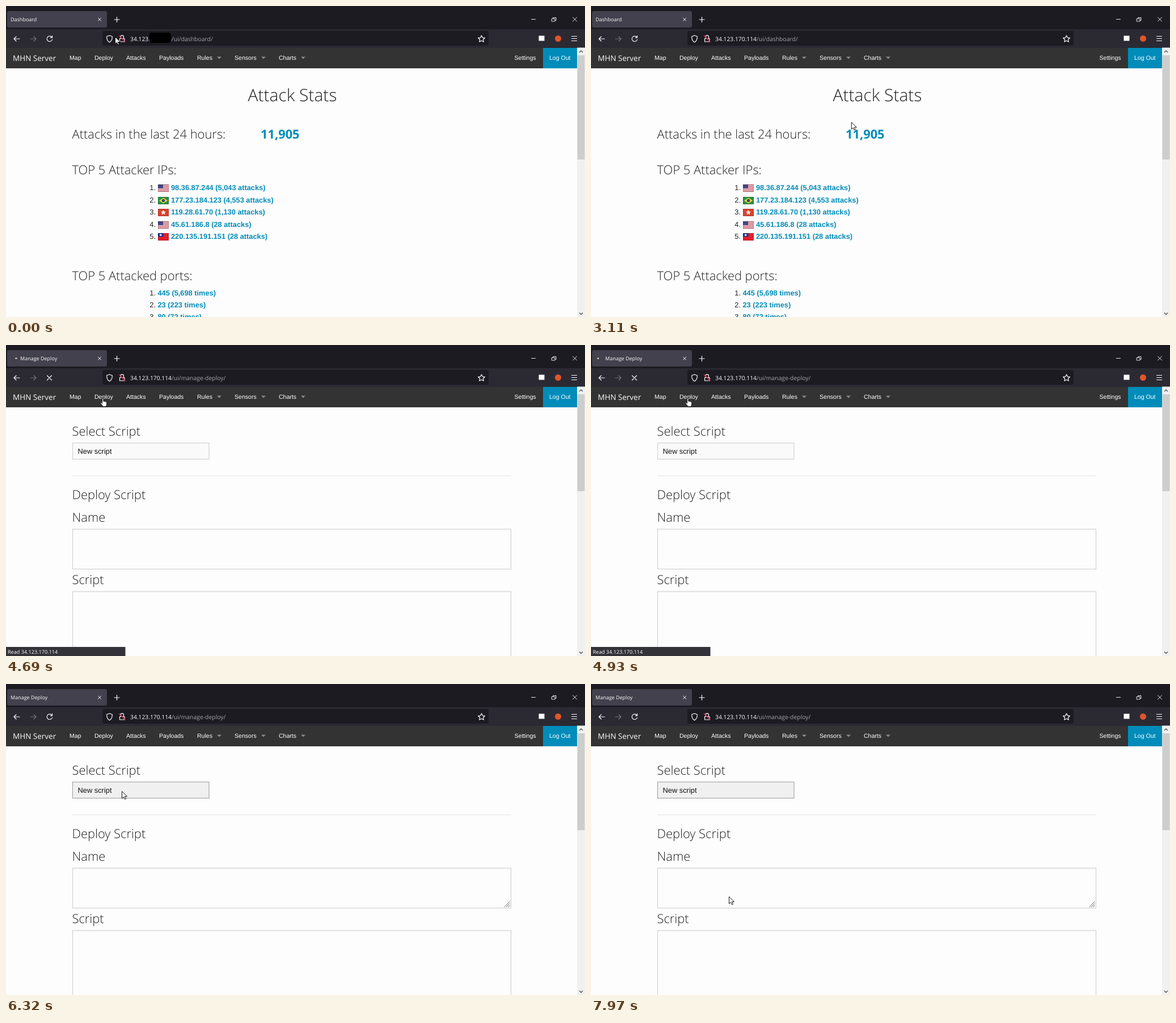
An HTML page for the animation above (8 s loop, 1021 by 549 pixels).

```html
<!DOCTYPE html>
<html lang="en">
<head>
<meta charset="utf-8">
<title>Dashboard walkthrough</title>
<style>
  html, body { margin: 0; width: 100%; height: 100%; overflow: hidden; background: #fdfdfd; }
  svg { display: block; width: 100vw; height: 100vh; }
  text { white-space: pre; text-rendering: geometricPrecision; }
  .ui { font-family: "Open Sans", "Noto Sans", sans-serif; fill: #fbfbfe; }
  .light { font-family: "Open Sans", "Noto Sans", sans-serif; font-weight: 300; fill: #222; }
  .arial { font-family: "Liberation Sans", Arial, sans-serif; }
  .link { fill: #008cba; font-weight: 700; }
  .line { fill: none; stroke: #fbfbfe; stroke-width: 1.2; stroke-linecap: round; stroke-linejoin: round; }
</style>
</head>
<body>
<svg id="stage" viewBox="0 0 1021 549" preserveAspectRatio="none"></svg>
<script>
const LOOP = 8000;
const HOST = "34.123.170.114";
const DEPLOY_PATH = "/ui/manage-deploy/";

const rect = (x, y, w, h, fill, extra = "") =>
  `<rect x="${x}" y="${y}" width="${w}" height="${h}" fill="${fill}" ${extra}/>`;
const text = (x, y, size, cls, str, extra = "") =>
  `<text x="${x}" y="${y}" font-size="${size}" class="${cls}" ${extra}>${str}</text>`;
const path = (d, attrs = 'class="line"') => `<path d="${d}" ${attrs}/>`;
const group = (id, body) => `<g id="${id}">${body}</g>`;
const light = (x, y, str, size = 21.9) => text(x, y, size, "light", str);

function browser() {
  return rect(0, 0, 1021, 42, "#1c1b22") + rect(0, 41, 1021, 33, "#2b2a33") +
    rect(2, 9, 176, 29, "#42414d", 'rx="3"') +
    group("dot", '<circle cy="23.5" r="1.6" fill="#d9c8b4"/>') +
    text(8, 27.2, 9, "ui", "Dashboard", 'id="title"') +
    path("M162.6 21.2l5 5m0-5l-5 5", 'class="line" style="stroke-width:1"') +
    path("M191 24h9M195.5 19.5v9") +
    path("M926.5 23.5h7M962.5 22.5h5.5v4.5h-5.5zM964.500 22v-1.500h5.500v5h-1.500M999.500 20l7 7m0-7l-7 7",
      'class="line" style="stroke-width:.9"') +
    path("M24 58H14m4-4l-4 4 4 4") +
    path("M43 58h10m-4-4l4 4-4 4", 'class="line" style="stroke:#74737c"') +
    group("reload", path("M81 55.200a4.800 4.800 0 1 0 .6 4M81.500 52.500v3.300h-3.300")) +
    group("stop", path("M72.500 54l8 8m0-8l-8 8")) +
    rect(170, 44, 681, 26, "#1c1b22", 'rx="3"') +
    path("M182.500 52l4.800 1.800c.3 5-1.200 8.200-4.800 10.200-3.600-2-5.100-5.200-4.800-10.200z") +
    path("M200.500 57.500h8.500v5.500h-8.500zM202 57v-2.500a2.700 2.700 0 0 1 5.400 0v2.500") +
    path("M199.500 52.500l10.500 10.500", 'class="line" style="stroke:#e22850;stroke-width:1.5"') +
    text(219, 61.6, 10.3, "ui", HOST) +
    text(292, 61.6, 10.4, "ui", "/ui/dashboard/", 'id="path" style="fill:#a5a4ac"') +
    rect(252.5, 47, 38.5, 18, "#000", 'rx="5" id="cover"') +
    path("M838.500 52l1.800 3.800 4.200.5-3.100 2.900.8 4.100-3.700-2-3.700 2 .8-4.100-3.100-2.900 4.200-.5z") +
    rect(939.5, 52.5, 10, 9, "#fbfbfe") +
    '<circle cx="973.5" cy="57.500" r="5.5" fill="#e0562a"/>' +
    path("M997.500 53.500h9m-9 4h9m-9 4h9");
}

function navbar() {
  const items = { Map: 112, Deploy: 156, Attacks: 212, Payloads: 270, Rules: 337,
    Sensors: 403, Charts: 481, Settings: 896.5, "Log Out": 958 };
  const labels = Object.entries(items)
    .map(([name, x]) => text(x, 95.3, 10.55, "arial", name, 'fill="#fff"')).join("");
  const carets = [376, 454, 524]
    .map(x => path(`M${x - 4} 89.500h8l-4 4z`, 'fill="#8b8b8b"')).join("");
  return rect(0, 73.5, 1007, 36.5, "#333") + rect(145, 73.5, 55.5, 36.5, "#222", 'id="hover"') +
    rect(947, 73.5, 60, 36.5, "#008cba") +
    text(12, 96.8, 13.5, "ui", "MHN Server") + labels + carets;
}

const flags = {
  us: () => Array.from({ length: 7 }, (_, i) => rect(0, i * 2, 19, 1, "#c8435a")).join("") +
    rect(0, 0, 9, 7, "#46467f"),
  br: () => rect(0, 0, 19, 13, "#279246") + path("M9.500 1.500l7.500 5-7.500 5-7.500-5z", 'fill="#f3d42c"') +
    '<circle cx="9.5" cy="6.5" r="2.700" fill="#2b4586"/>',
  hk: () => rect(0, 0, 19, 13, "#d9432f") + Array.from({ length: 5 }, (_, i) =>
    `<ellipse cx="9.500" cy="4.400" rx="1" ry="1.900" fill="#fff" transform="rotate(${i * 72} 9.500 6.500)"/>`).join(""),
  tw: () => rect(0, 0, 19, 13, "#e3202d") + rect(0, 0, 9.5, 6.5, "#23308f") +
    '<circle cx="4.700" cy="3.300" r="1.800" fill="#fff"/>'
};

function dashboard() {
  const attackers = [
    ["us", "98.36.87.244 (5,043 attacks)"],
    ["br", "177.23.184.123 (4,553 attacks)"],
    ["hk", "119.28.61.70 (1,130 attacks)"],
    ["us", "45.61.186.8 (28 attacks)"],
    ["tw", "220.135.191.151 (28 attacks)"]
  ];
  const ports = ["445 (5,698 times)", "23 (223 times)", "80 (72 times)"];
  const row = (i, y, x, label) => text(253.3, y, 12.8, "arial", `${i + 1}.`, 'fill="#222"') +
    text(x, y, 12.8, "arial link", label);
  return light(426.5, 168, "Attack Stats", 30) +
    light(116.5, 234, "Attacks in the last 24 hours:") +
    text(449, 234, 21.8, "ui link", "11,905", 'style="fill:#008cba"') +
    light(116.5, 297, "TOP 5 Attacker IPs:") +
    attackers.map(([flag, label], i) => {
      const y = 325.4 + i * 21.4;
      return row(i, y, 291, label) +
        `<g transform="translate(268 ${Math.round(y - 10)})">` + rect(0, 0, 19, 13, "#f4f0f0") + flags[flag]() +
        rect(.5, .5, 18, 12, "none", 'stroke="#000" stroke-opacity=".2"') + "</g>";
    }).join("") +
    light(116.5, 484, "TOP 5 Attacked ports:") +
    ports.map((label, i) => row(i, 511.3 + i * 20.8, 267.5, label)).join("");
}

function deployPage() {
  const box = (y, h) => rect(117.5, y, 773, h, "#fdfdfd", 'stroke="#ccc"') +
    rect(118, y + .5, 772, 1, "#e9e9e9");
  return light(116.5, 160, "Select Script") +
    rect(117.5, 173, 240.5, 28.5, "#fafafa", 'stroke="#ccc" id="select"') +
    text(126.5, 192, 12.85, "arial", "New script", 'fill="#111"') +
    rect(117, 230.5, 774, 1, "#e2e2e2") +
    light(116.5, 272, "Deploy Script") + light(116.5, 311.5, "Name") +
    box(325, 70.5) + light(116.5, 421.5, "Script") + box(435, 130) +
    group("grip", path("M878.500 394l10-10.500M882 394l6.500-7M885.500 394l3-3.500", 'fill="none" stroke="#666"'));
}

function overlays() {
  const outline = 'fill="#fff" stroke="#000" stroke-width=".9" stroke-linejoin="round"';
  return rect(1007, 73.5, 14, 476, "#f0f0f0") + rect(1007.5, 87, 13, 184, "#cdcdcd", 'id="thumb"') +
    path("M1011 82l3-3 3 3M1011 541.500l3 3 3-3", 'fill="none" stroke="#555" stroke-width="1.4"') +
    group("status", rect(0, 533, 155, 16, "#333238", 'id="statusBox"') + text(3, 545, 9.1, "ui", "", 'id="statusText"')) +
    group("cursor",
      group("arrow", path("M.5.500v12.500l3-2.800 2 4.300 2-.9-2-4.200h4z", outline)) +
      group("hand", path("M1.500 1.200c0-1.600 2.300-1.600 2.300 0v4.300c.4-.7 1.900-.5 2 .3.500-.6 1.900-.4 2 .5.700-.5 1.800-.1 1.800.9v3.300c0 1.500-1 2.200-1 4.300H2.600c0-2-2.500-3.500-3.800-5.800-.8-1.300.9-2 1.700-1l1 1.200z", outline)));
}

const stage = document.getElementById("stage");
stage.innerHTML = rect(0, 0, 1021, 549, "#fdfdfd") + group("dashboard", dashboard()) +
  group("deploy", deployPage()) + navbar() + browser() + overlays();

const el = {};
stage.querySelectorAll("[id]").forEach(node => el[node.id] = node);
const show = (node, on) => node.setAttribute("display", on ? "inline" : "none");
const set = (node, attrs) => Object.entries(attrs).forEach(([k, v]) => node.setAttribute(k, v));
const between = (t, a, b) => t >= a && t < b;

// Pointer stops: time, x, y
const stops = [
  [30, 192, 54], [390, 367, 177], [2010, 367, 177], [2400, 450, 285], [2810, 575, 258],
  [3010, 575, 258], [3210, 346, 153], [3400, 346, 153], [3900, 168, 94], [5250, 168, 94],
  [5460, 177, 118], [5830, 198, 180], [6320, 204, 189], [6700, 206, 200], [7450, 245, 380],
  [7970, 243, 375]
];

function pointerAt(t) {
  const next = stops.findIndex(s => s[0] > t);
  if (next === 0) return stops[0].slice(1);
  if (next < 0) return stops[stops.length - 1].slice(1);
  const [t0, x0, y0] = stops[next - 1], [t1, x1, y1] = stops[next];
  const u = (t - t0) / (t1 - t0), k = u * u * (3 - 2 * u);
  return [x0 + (x1 - x0) * k, y0 + (y1 - y0) * k];
}

function render(t) {
  const onDeploy = t >= 4600;
  const loading = between(t, 4300, 5100);
  const hovering = between(t, 3880, 4600) || between(t, 5120, 5900);
  const focused = t >= 5840;
  const [x, y] = pointerAt(t);
  const overLink = between(t, 3700, 5500) && y < 110;

  show(el.dashboard, !onDeploy);
  show(el.deploy, onDeploy);
  show(el.grip, !loading);
  show(el.hover, hovering);
  show(el.reload, !loading);
  show(el.stop, loading);
  show(el.dot, loading);
  el.dot.setAttribute("transform", `translate(${15 + 4 * Math.cos((t - 4570) / 160)} 0)`);
  el.title.textContent = onDeploy ? "Manage Deploy" : "Dashboard";
  el.title.setAttribute("x", loading ? 25 : 8);
  el.path.textContent = onDeploy ? DEPLOY_PATH : "/ui/dashboard/";
  el.cover.setAttribute("opacity", t < 2000 ? 1 : Math.max(0, .9 - (t - 2010) / 400));
  el.thumb.setAttribute("height", onDeploy ? 171 : 184);
  set(el.select, focused ? { fill: "#f0f0f0", stroke: "#999" } : { fill: "#fafafa", stroke: "#ccc" });

  const reading = onDeploy && loading;
  show(el.status, hovering || reading);
  el.statusBox.setAttribute("width", reading ? 210.5 : 155);
  el.statusText.textContent = reading ? `Read ${HOST}` : HOST + DEPLOY_PATH;

  el.cursor.setAttribute("transform", `translate(${x.toFixed(1)} ${y.toFixed(1)})`);
  show(el.arrow, !overLink);
  show(el.hand, overLink);
}

const start = performance.now();
function tick() {
  render((performance.now() - start) % LOOP);
  requestAnimationFrame(tick);
}
tick();
</script>
</body>
</html>
```
